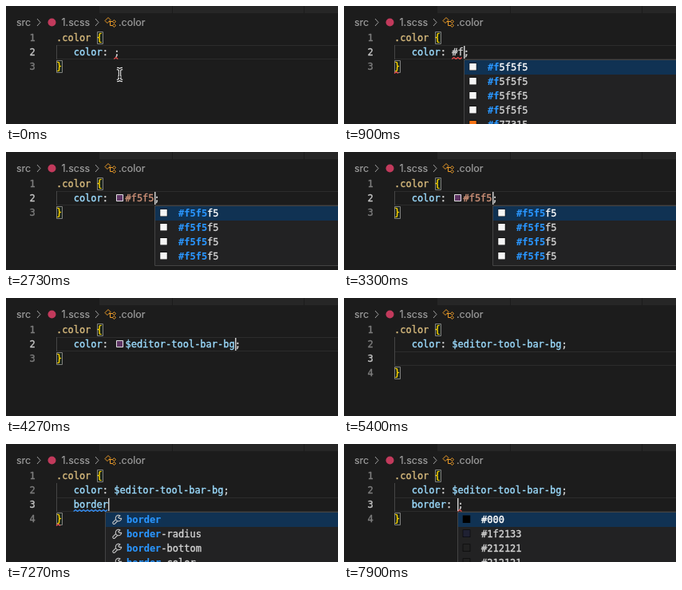
These frames come from a looping animation (416 px wide and 148 px high, 8000 ms). An HTML page with a canvas:

```html
<!DOCTYPE html>
<html lang="en">
<head>
<meta charset="utf-8">
<title>Color completion</title>
<style>
html, body { margin: 0; width: 100%; height: 100%; overflow: hidden; background: #1c1c1c; }
canvas { display: block; width: 416px; height: 148px; }
</style>
</head>
<body>
<canvas id="stage"></canvas>
<script>
const W = 416, H = 148, LOOP = 8000;
const CHAR = 7.224, LINE = 18, LEFT = 63, INDENT = LEFT + 3 * CHAR, SWATCH = 14.2;
const MONO = '12px "DejaVu Sans Mono", monospace';
const UI = '12.5px Inter, sans-serif';
const C = {
  bg: '#1c1c1c', tab: '#262626', rule: '#2c2c2c', guide: '#454545',
  crumb: '#a0a0a0', num: '#7d7d7d', numOn: '#c6c6c6', text: '#d4d4d4',
  prop: '#9cdcfe', sel: '#d7ba7d', value: '#ce9178', brace: '#ffd700',
  error: '#f14c4c', info: '#3794ff', match: '#2a96ff',
  popup: '#222223', edge: '#434343', row: '#103253', orange: '#ee9d28'
};

const canvas = document.getElementById('stage');
const ctx = canvas.getContext('2d');
const dpr = window.devicePixelRatio || 1;
canvas.width = W * dpr;
canvas.height = H * dpr;
ctx.scale(dpr, dpr);
ctx.lineJoin = 'round';

const darks = ['#000', '#1f2133', '#212121', '#212121'];
const whites = Array(4).fill('#f5f5f5');
const borders = ['border', 'border-radius', 'border-bottom', 'border-color'];

// Each step overrides parts of the state before it.
const steps = [
  [0, { value: '', valueColor: C.text, semi: true, swatch: '', wavy: 'semi', line3: null,
        list: null, match: '', mouse: true, caret: false }],
  [250, { value: '#', wavy: 'value', mouse: false, caret: true }],
  [340, { list: darks, match: '#' }],
  [700, { value: '#f', list: [...whites, '#f77315'], match: '#f' }],
  [1700, { value: '#f5', match: '#f5' }],
  [2100, { value: '#f5f', valueColor: C.value, wavy: '', list: whites, match: '#f5f' }],
  [2400, { value: '#f5f5', match: '#f5f5' }],
  [2530, { swatch: '#5f3565' }],
  [3730, { value: '$editor-tool-bar-bg', valueColor: C.prop, list: null, match: '' }],
  [4730, { line3: '' }],
  [4900, { swatch: '' }],
  [5230, { caret: false }],
  [5730, { caret: true }],
  ...[6730, 6840, 6940, 7030, 7120, 7200].map((t, i) => {
    const word = 'border'.slice(0, i + 1);
    return [t, { line3: word, match: word, list: i ? borders : null }];
  }),
  [7570, { line3: 'border: ', list: null, match: '' }],
  [7680, { list: darks }]
];

function stateAt(t) {
  const s = {};
  for (const [at, change] of steps) if (t >= at) Object.assign(s, change);
  return s;
}

const rowY = n => 31 + (n - 1) * LINE;

function rect(x, y, w, h, color) {
  ctx.fillStyle = color;
  ctx.fillRect(x, y, w, h);
}

function frame(x, y, w, h, color) {
  ctx.strokeStyle = color;
  ctx.lineWidth = 1;
  ctx.strokeRect(x + .5, y + .5, w - 1, h - 1);
}

// A hairline outline gives the slightly heavy look of smoothed type.
function text(str, x, y, color, font = MONO, weight = .35) {
  ctx.font = font;
  ctx.fillStyle = ctx.strokeStyle = color;
  ctx.lineWidth = weight;
  ctx.fillText(str, x, y);
  ctx.strokeText(str, x, y);
}

function path(points, color, width = 1) {
  ctx.beginPath();
  points.forEach(([x, y], i) => i ? ctx.lineTo(x, y) : ctx.moveTo(x, y));
  ctx.strokeStyle = color;
  ctx.lineWidth = width;
  ctx.stroke();
}

function code(str, x, line, color) {
  text(str, x, rowY(line) + 13, color);
  return x + str.length * CHAR;
}

function squiggle(x, line, chars, color) {
  const y = rowY(line) + 15.5, points = [];
  for (let i = 0; i * 2.5 <= chars * CHAR; i++) points.push([x + i * 2.5, y + (i % 2 ? 0 : 2)]);
  path(points, color, 1.2);
}

function brace(ch, x, line) {
  const left = Math.round(x), y = rowY(line) + 1;
  rect(left, y, 8, 16, '#1c251c');
  frame(left, y, 8, 16, '#808080');
  code(ch, x, line, C.brace);
}

function chevron(x) {
  path([[x, 16], [x + 4, 20.5], [x, 25]], C.crumb);
}

function classIcon(x, y) {
  path([[x + 4, y], [x + 7, y + 3], [x + 3, y + 7], [x, y + 4], [x + 4, y]], C.orange);
  path([[x + 5, y + 5], [x + 10, y + 5]], C.orange);
  path([[x + 6.5, y + 5], [x + 6.5, y + 10], [x + 10, y + 10]], C.orange);
  for (const dy of [3, 8])
    path([[x + 11.5, y + dy], [x + 13.5, y + dy + 2], [x + 11.5, y + dy + 4], [x + 9.5, y + dy + 2], [x + 11.5, y + dy]], C.orange);
}

function wrench(x, y) {
  ctx.beginPath();
  ctx.moveTo(x + 10, y + .8);
  ctx.arc(x + 8, y + 4, 3.7, -1, .1, true);
  ctx.lineTo(x + 9, y + 4.4);
  ctx.lineTo(x + 7.7, y + 3);
  ctx.closePath();
  ctx.moveTo(x + 4.8, y + 5.4);
  ctx.lineTo(x + .8, y + 9.4);
  ctx.quadraticCurveTo(x + .8, y + 11.8, x + 3, y + 11.4);
  ctx.lineTo(x + 6.8, y + 7.5);
  ctx.strokeStyle = '#c5c5c5';
  ctx.lineWidth = 1.1;
  ctx.stroke();
}

function header() {
  rect(117, 0, W - 117, 9, C.tab);
  rect(208, 0, 1, 9, C.bg);
  rect(373, 0, 1, 9, C.bg);
  text('src', 13, 25, C.crumb, UI, .15);
  chevron(39);
  ctx.beginPath();
  ctx.arc(57.5, 20.5, 5, 0, 7);
  ctx.fillStyle = '#c23a5c';
  ctx.fill();
  text('1.scss', 69.5, 25, C.crumb, UI, .15);
  chevron(112);
  classIcon(124, 14.5);
  text('.color', 141, 25, C.crumb, UI, .15);
}

// Typed characters light up wherever they occur, in order.
function suggestion(label, match, x, y, color) {
  let hit = 0;
  [...label].forEach((ch, i) => {
    const on = ch === match[hit];
    if (on) hit++;
    text(ch, x + i * CHAR, y, on ? C.match : color, on ? 'bold ' + MONO : MONO, on ? .1 : .35);
  });
}

function popup(s, x, line) {
  const top = rowY(line + 1), words = s.list === borders;
  const height = s.list.length * LINE + 4;
  rect(x, top, W - x, height, C.popup);
  frame(x, top, W - x + 2, height, C.edge);
  rect(x + 1, top + 1, W - x, LINE, C.row);
  s.list.forEach((label, i) => {
    const y = top + i * LINE;
    if (words) {
      wrench(x + 9, y + 4);
    } else {
      rect(x + 6.75, y + 4.5, 9.5, 9.5, '#000');
      rect(x + 7.25, y + 5, 8.5, 8.5, label);
    }
    suggestion(label, s.match, x + (words ? 27 : 30), y + 14, i ? C.text : '#fff');
  });
}

function iBeam(x, y) {
  for (const [color, width] of [['#eee', 3.4], ['#111', 1.2]]) {
    for (const side of [-1, 1])
      path([[x - 3.5, y + side * 7.5], [x - 1.5, y + side * 7.2], [x, y + side * 6],
            [x + 1.5, y + side * 7.2], [x + 3.5, y + side * 7.5]], color, width);
    path([[x, y - 6], [x, y + 6]], color, width);
    path([[x - 2, y + 3], [x + 2, y + 3]], color, width);
  }
}

function draw(t) {
  const s = stateAt(t);
  const open = s.line3 !== null, active = open ? 3 : 2, last = open ? 4 : 3;
  rect(0, 0, W, H, C.bg);
  header();

  rect(LEFT, rowY(active), W, 1, C.rule);
  rect(LEFT, rowY(active) + 17, W, 1, C.rule);
  rect(LEFT, rowY(2), 1, (last - 2) * LINE, C.guide);
  for (let n = 1; n <= last; n++) code(String(n), 29.5, n, n === active ? C.numOn : C.num);

  code('.color', LEFT, 1, C.sel);
  brace('{', LEFT + 7 * CHAR, 1);
  brace('}', LEFT, last);

  let x = code('color', INDENT, 2, C.prop);
  x = code(': ', x, 2, C.text);
  if (s.swatch) {
    rect(x + 3, 53, 9, 9, s.swatch);
    frame(Math.round(x + 3), 53, 9, 9, '#ddd');
    x += SWATCH;
  }
  const start = x;
  x = code(s.value, x, 2, s.valueColor);
  code(';', x, 2, C.text);
  if (s.wavy === 'semi') squiggle(x, 2, 1, C.error);
  if (s.wavy === 'value') {
    squiggle(start, 2, s.value.length, C.error);
    squiggle(LEFT, last, 1, C.error);
  }

  if (open) {
    const word = s.line3.replace(': ', ''), done = word !== s.line3;
    x = code(word, INDENT, 3, word === 'b' ? C.sel : C.prop);
    if (done) {
      x = code(': ', x, 3, C.text);
      code(';', x, 3, C.text);
      squiggle(x, 3, 1, C.error);
    } else if (word) {
      if (word === 'border') squiggle(INDENT, 3, 6, C.info);
      squiggle(LEFT, 4, 1, C.error);
    }
  }

  if (s.list) popup(s, Math.round(x) - (s.list === borders ? 4 : 0), active);
  if (s.caret) rect(Math.round(x), rowY(active) + 1, 1.5, 16, '#ccc');
  if (s.mouse) iBeam(142.5, 86);
}

function tick() {
  draw(performance.now() % LOOP);
  requestAnimationFrame(tick);
}
tick();
</script>
</body>
</html>
```
